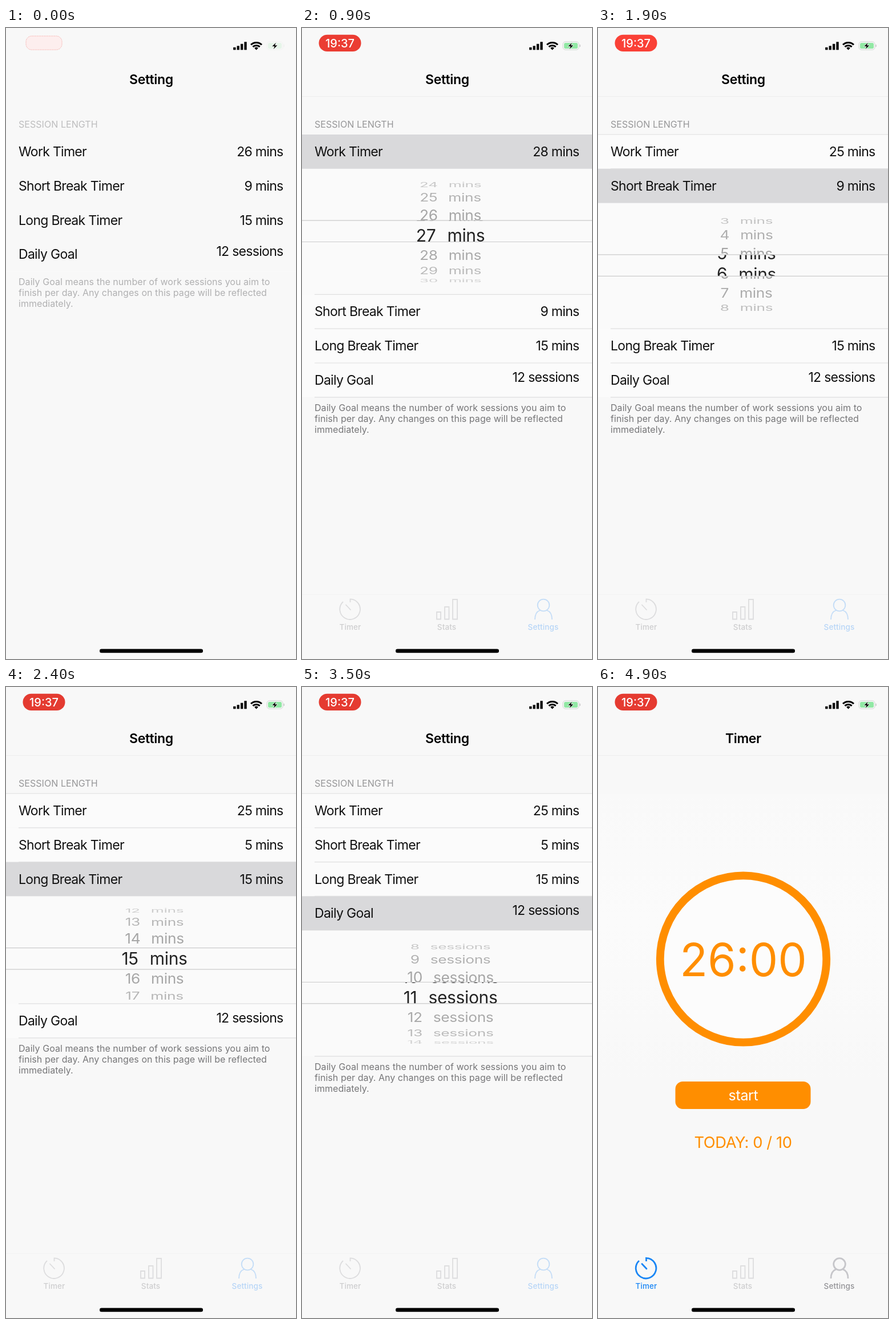
Write an HTML page that moves like this. It is 508x1102 px and loops after 5 s.

```html
<!DOCTYPE html>
<html lang="en">
<head>
<meta charset="utf-8">
<title>Timer settings</title>
<style>
  html, body { margin: 0; width: 100%; height: 100%; overflow: hidden; background: #f8f8f8; }
  svg { display: block; width: 100vw; height: 100vh; font-family: Inter, Roboto, sans-serif; }
  .title { font-size: 23px; font-weight: 600; letter-spacing: -.35px; text-anchor: middle; }
  .cell { font-size: 23px; letter-spacing: -.7px; fill: #111; }
  .note { font-size: 16px; letter-spacing: .05px; fill: #767678; }
  .end { text-anchor: end; }
  .mid { text-anchor: middle; }
  .line { stroke: #dfdfe0; stroke-width: 1.2; }
  .wheel { text-anchor: middle; word-spacing: 12px; letter-spacing: -.35px; }
  .tab { font-size: 13.5px; font-weight: 500; letter-spacing: .1px; text-anchor: middle; stroke: none; }
  .icon { fill: none; stroke-width: 2.8; }
  .pale .icon { stroke-width: 1.8; }
  .pale { opacity: .32; }
  .orange { fill: #ff8e00; }
</style>
</head>
<body>
<svg viewBox="0 0 508 1102" preserveAspectRatio="none">
  <defs>
    <clipPath id="pickerClip"><rect id="pickerWindow" width="508" height="220"/></clipPath>
    <clipPath id="bandClip"><rect y="90.3" width="508" height="37.4"/></clipPath>
    <linearGradient id="glow" x1="0" y1="0" x2="0" y2="1">
      <stop offset="0" stop-color="#f9f9f9"/>
      <stop offset=".45" stop-color="#fbfbfb"/>
      <stop offset="1" stop-color="#f8f8f8"/>
    </linearGradient>
  </defs>
  <rect width="508" height="1102" fill="#f8f8f8"/>

  <g id="settingsView">
    <text class="title" x="254.4" y="98">Setting</text>
    <text id="section" class="note" x="22" y="174">SESSION LENGTH</text>
    <g id="picker" clip-path="url(#pickerClip)">
      <rect width="508" height="220" fill="#fafafa"/>
      <g id="outer" class="wheel" font-size="26.3"></g>
      <rect y="90.3" width="508" height="37.4" fill="#fafafa"/>
      <g clip-path="url(#bandClip)"><g id="inner" class="wheel" font-size="30" fill="#222"></g></g>
      <path d="M0 90.3H508M0 127.7H508" stroke="#cbcbcc" stroke-width="1.2"/>
    </g>
    <g id="rows"></g>
    <path id="topLine" class="line" d="M0 186H508"/>
    <g id="footer" class="note">
      <path id="footLine" class="line" d="M22 0H508"/>
      <text x="22" y="24">Daily Goal means the number of work sessions you aim to</text>
      <text x="22" y="43">finish per day. Any changes on this page will be reflected</text>
      <text x="22" y="62">immediately.</text>
    </g>
  </g>

  <g id="timerView">
    <rect y="186" width="508" height="500" fill="url(#glow)"/>
    <text class="title" x="254.4" y="98">Timer</text>
    <circle cx="254.5" cy="475" r="145.7" fill="#fcfcfc" stroke="#ff8e00" stroke-width="13.8"/>
    <text class="orange mid" x="254.5" y="505" font-size="80">26:00</text>
    <rect class="orange" x="135.5" y="689" width="237" height="48" rx="13"/>
    <text class="mid" x="254.5" y="721.5" font-size="25" letter-spacing="-.3" fill="#fff">start</text>
    <text class="orange mid" x="254" y="804.5" font-size="27.3" letter-spacing="-.4">TODAY: 0 / 10</text>
  </g>

  <path id="navLine" d="M0 119.5H508" stroke="#ededed" stroke-width="1.2"/>
  <g id="tabs">
    <path d="M0 989.5H508" stroke="#f3f3f3"/>
    <g id="timerTab">
      <path class="icon" d="M84.5 1003V997.3A17.8 17.8 0 1 1 72 1002"/>
      <path class="icon" d="M77 1007.5L85 1016" stroke-linecap="round"/>
      <text class="tab" x="84.5" y="1051">Timer</text>
    </g>
    <g class="pale" stroke="#a4a4a8" fill="#77777b">
      <path class="icon" d="M236 1020h7v12.5h-7zM250 1011h7.5v21.5h-7.5zM264 998h8v34.5h-8z"/>
      <text class="tab" x="253.5" y="1051">Stats</text>
    </g>
    <g id="settingsTab">
      <circle class="icon" cx="423" cy="1008" r="10.3"/>
      <path class="icon" d="M408 1033C408 1024 411 1019 417 1017M438 1033C438 1024 435 1019 429 1017"/>
      <text class="tab" x="422.5" y="1051">Settings</text>
    </g>
  </g>

  <rect id="pill" x="29.5" y="11.7" width="74" height="29.3" rx="14.6"/>
  <rect id="pillGhost" x="35" y="14" width="63" height="24" rx="10" fill="#fdeeee" stroke="#f7b5b2" stroke-dasharray="2 1"/>
  <text id="clock" class="mid" x="66.5" y="33.5" font-size="20" font-weight="500" fill="#fff">19:37</text>
  <path d="M400.3 38.3v-4.5M406.7 38.3v-7M413.1 38.3v-10.5M419.5 38.3v-14" stroke="#000" stroke-width="4.3"/>
  <g fill="none" stroke="#000" stroke-width="3">
    <path d="M429 29.3A13.5 13.5 0 0 1 448 29.3M432.4 32.9A8.7 8.7 0 0 1 444.6 32.9"/>
    <path d="M438.5 38.5l-3.3-3.6a5 5 0 0 1 6.6 0z" fill="#000" stroke="none"/>
  </g>
  <g id="battery">
    <rect x="457" y="24" width="28" height="14" rx="4.3" fill="none" stroke="#c9cfca"/>
    <rect x="459" y="26" width="24" height="10" rx="2.5" fill="#86e79b"/>
    <path d="M487 29v4" stroke="#c4c4c4" stroke-width="1.5"/>
  </g>
  <path d="M473.5 24.5L465.5 32.3H470L468 38L476 30H471.5Z" stroke="#f8f8f8" stroke-width=".8"/>
  <rect x="164" y="1084.6" width="181" height="6.6" rx="3.3"/>
</svg>

<script>
const LOOP = 5000, STEP = 100, TOP = 186, ROW = 59.8, PICKER = 219.6;
const RADIUS = 90, ANGLE = 0.4, CENTER = 109, HORIZON = 1.3;
const $ = id => document.getElementById(id);

function add(parent, tag, attrs, text = '') {
  const el = document.createElementNS('http://www.w3.org/2000/svg', tag);
  for (const key in attrs) el.setAttribute(key, attrs[key]);
  el.textContent = text;
  return parent.appendChild(el);
}

// Tracks are [time, value] pairs: open and wheel are interpolated, value is held.
const rows = [
  { label: 'Work Timer', unit: 'mins', lit: [200, 1500],
    open: [[200, 0], [300, .6], [400, 1], [1200, 1], [1300, .97], [1400, 0]],
    wheel: [[400, 26], [500, 27.52], [600, 28], [800, 28], [1000, 25.6], [1100, 25]],
    value: [[0, 26], [700, 28], [1100, 25]] },
  { label: 'Short Break Timer', unit: 'mins', lit: [1500, 2300],
    open: [[1500, 0], [1600, .86], [1700, 1], [2000, 1], [2100, .97], [2200, 0]],
    wheel: [[1700, 9], [1800, 7.6], [1900, 5.6], [2000, 5]],
    value: [[0, 9], [2000, 5]] },
  { label: 'Long Break Timer', unit: 'mins', lit: [2300, 3100],
    open: [[2300, 0], [2400, .855], [2500, 1], [2900, 1], [3000, .97], [3100, 0]],
    wheel: [[2500, 15], [2600, 16.3], [2700, 17], [2800, 15.6], [2900, 15]],
    value: [[0, 15]] },
  { label: 'Daily Goal', unit: 'sessions', lit: [3100, 4000], lift: 5,
    open: [[3100, 0], [3200, .86], [3300, 1], [3700, 1], [3800, .97], [3900, 0]],
    wheel: [[3400, 12], [3500, 10.77], [3600, 10]],
    value: [[0, 12], [3600, 10]] }
];

for (const row of rows) {
  row.group = add($('rows'), 'g', {});
  row.back = add(row.group, 'rect', { width: 508, height: ROW });
  row.line = add(row.group, 'path', { class: 'line', d: 'M22 0H508' });
  add(row.group, 'text', { class: 'cell', x: 22, y: 38 }, row.label);
  row.text = add(row.group, 'text', { class: 'cell end', x: 485.5, y: 38 - (row.lift || 0) });
}
const layers = ['outer', 'inner'].map(id =>
  Array.from({ length: 9 }, () => add($(id), 'text', {})));

function ease(track, t) {
  const next = track.findIndex(([time]) => time > t);
  if (next === 0) return track[0][1];
  if (next < 0) return track[track.length - 1][1];
  const [t0, a] = track[next - 1], [t1, b] = track[next];
  return a + (b - a) * (t - t0) / (t1 - t0);
}
const held = (track, t) => track.filter(([time]) => time <= t).pop()[1];
const show = (id, on) => { $(id).style.display = on ? '' : 'none'; };

function drawWheel(position, unit) {
  layers.forEach((items, inner) => items.forEach((item, i) => {
    const n = Math.round(position) + i - 4;
    const angle = (n - position) * ANGLE;
    const visible = n > 0 && Math.abs(angle) < HORIZON;
    item.style.display = visible ? '' : 'none';
    if (!visible) return;
    const squash = Math.cos(angle);
    item.textContent = `${n} ${unit}`;
    item.setAttribute('y', inner ? 10.9 : 9.6);
    item.setAttribute('transform',
      `translate(260 ${CENTER + RADIUS * Math.sin(angle)}) scale(1 ${squash})`);
    item.setAttribute('opacity', inner ? 1 : .08 + .27 * squash);
  }));
}

function drawSettings(t, loaded) {
  let y = TOP, opened = false;
  for (const row of rows) {
    const lit = t >= row.lit[0] && t < row.lit[1];
    const open = ease(row.open, t);
    row.group.setAttribute('transform', `translate(0 ${y})`);
    row.back.setAttribute('fill', lit ? '#d9d9db' : loaded ? '#fbfbfb' : '#f8f8f8');
    row.line.style.display = loaded && y > TOP ? '' : 'none';
    row.text.textContent = `${held(row.value, t)} ${row.unit}`;
    y += ROW;
    if (open > 0) {
      opened = true;
      $('picker').setAttribute('transform', `translate(0 ${y})`);
      $('pickerWindow').setAttribute('height', PICKER * open);
      drawWheel(ease(row.wheel, t), row.unit);
      y += PICKER * open;
    }
  }
  show('picker', opened);
  show('topLine', loaded && !(t >= rows[0].lit[0] && t < rows[0].lit[1]));
  show('footLine', loaded);
  $('footer').setAttribute('transform', `translate(0 ${y})`);
  $('footer').setAttribute('opacity', loaded ? 1 : .55);
  $('section').setAttribute('opacity', loaded ? .75 : .45);
}

function paintTab(id, icon, label, pale) {
  $(id).setAttribute('stroke', icon);
  $(id).setAttribute('fill', label);
  $(id).classList.toggle('pale', pale);
}

function render(t) {
  const loaded = t >= STEP, timer = t >= 4100;
  show('settingsView', !timer);
  show('timerView', timer);
  for (const id of ['navLine', 'tabs', 'pill', 'clock']) show(id, loaded);
  show('pillGhost', !loaded);
  $('battery').setAttribute('opacity', loaded ? .9 : .15);

  const glow = .5 + .5 * Math.cos((t - 500) / 1233 * 2 * Math.PI);
  $('pill').setAttribute('fill', `rgb(${228 + 27 * glow}, ${59 + 7 * glow}, ${49 + 7 * glow})`);

  if (timer) {
    paintTab('timerTab', '#1a86f5', '#1a86f5', false);
    paintTab('settingsTab', '#c6c6ca', '#929296', false);
  } else {
    paintTab('timerTab', '#a4a4a8', '#77777b', true);
    paintTab('settingsTab', '#5aa5f5', '#2f8df5', true);
    drawSettings(t, loaded);
  }
}

const start = performance.now();
function tick() {
  const t = (performance.now() - start) % LOOP;
  render(Math.floor(t / STEP) * STEP);
  requestAnimationFrame(tick);
}
tick();
</script>
</body>
</html>
```
